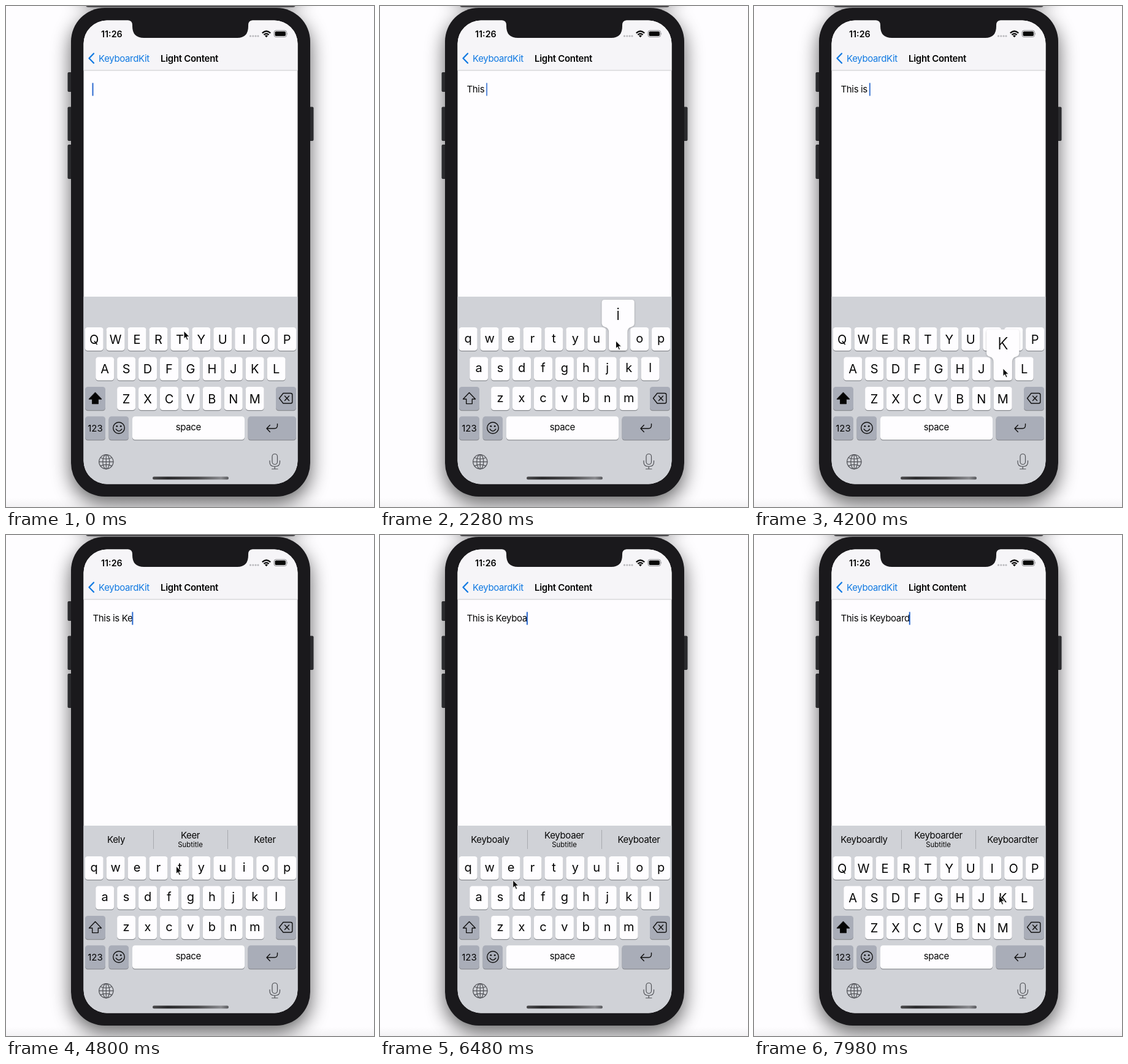
An HTML page that plays this animation: 600 px wide and 817 px high, repeating every 8 s.

```html
<!DOCTYPE html>
<html lang="en">
<head>
<meta charset="utf-8">
<title>Keyboard typing</title>
<style>
  html, body { margin: 0; width: 100%; height: 100%; overflow: hidden; background: #fefdff; }
  svg { display: block; width: 100%; height: 100%; }
  text { font-family: Inter, "Open Sans", sans-serif; font-size: 15px; letter-spacing: -.35px; fill: #050505; white-space: pre; }
  .mid { text-anchor: middle; }
  .key { font-size: 20px; letter-spacing: 0; }
  .line { fill: none; stroke: #111; stroke-width: 1.4; stroke-linecap: round; stroke-linejoin: round; }
  .gray { stroke: #505257; stroke-width: 1.2; }
</style>
</head>
<body>
<svg viewBox="0 0 600 817">
  <defs>
    <filter id="soft" x="-40%" y="-20%" width="180%" height="140%"><feGaussianBlur stdDeviation="16"/></filter>
    <filter id="lift" x="-30%" y="-30%" width="160%" height="160%"><feDropShadow dx="0" dy="1" stdDeviation="1.6" flood-opacity=".28"/></filter>
    <linearGradient id="floor" x1="0" y1="0" x2="0" y2="1"><stop offset="0" stop-color="#fefdff"/><stop offset="1" stop-color="#f3f2f4"/></linearGradient>
    <linearGradient id="bar"><stop offset="0" stop-color="#4a4a4c"/><stop offset=".2" stop-color="#29292b"/><stop offset=".6" stop-color="#4b4b4d"/><stop offset=".9" stop-color="#8b8c90"/><stop offset="1" stop-color="#58595c"/></linearGradient>
    <clipPath id="glass"><rect x="126.5" y="23.5" width="349" height="756" rx="38"/></clipPath>
  </defs>

  <rect width="600" height="817" fill="#fefdff"/>
  <rect y="802" width="600" height="15" fill="url(#floor)"/>
  <g filter="url(#soft)" fill="#000" opacity=".62">
    <rect x="106" y="17" width="390" height="794" rx="54"/>
    <rect x="106" y="-800" width="390" height="800" rx="54"/>
  </g>
  <rect x="130" y="-10" width="342" height="12" rx="4" fill="#4a494c"/>

  <g fill="#2b2b2e">
    <rect x="100.5" y="108" width="8" height="32" rx="2"/>
    <rect x="100.5" y="164.500" width="8" height="55.500" rx="2"/>
    <rect x="100.500" y="226" width="8" height="56" rx="2"/>
    <rect x="493" y="164.500" width="8.500" height="55.500" rx="2"/>
  </g>
  <rect x="106" y="3" width="390" height="797" rx="55" fill="#1a191c"/>

  <g clip-path="url(#glass)">
    <rect x="126" y="23" width="350" height="757" fill="#fefdff"/>
    <rect x="126" y="23" width="350" height="82" fill="#f6f5f8"/>
    <rect x="126" y="104.500" width="350" height="1" fill="#c9c9cc"/>
    <rect x="126" y="474" width="350" height="306" fill="#d0d2d7"/>
  </g>
  <path d="M199 23 Q206 24 206 31 V33 Q206 52 225 52 H377 Q395 52 395 33 V31 Q395 24 402 23 Z" fill="#1a191c"/>

  <text x="155" y="50.500" font-weight="600" style="font-size:14.300px;letter-spacing:0">11:26</text>
  <g fill="#b9b9bd"><circle cx="398.500" cy="49" r="1.600"/><circle cx="402.800" cy="49" r="1.600"/><circle cx="407" cy="49" r="1.600"/><circle cx="411" cy="49" r="1.600"/></g>
  <g fill="none" stroke="#0a0a0a" stroke-width="2.300">
    <path d="M417.800 44.200 Q424.500 37.800 431.200 44.200"/>
    <path d="M420.400 47 Q424.500 43.200 428.600 47"/>
  </g>
  <path d="M422 48.600 Q424.500 46.500 427 48.600 L424.500 51.200 Z"/>
  <rect x="437" y="40" width="20.500" height="10.500" rx="3" fill="none" stroke="#8a8a8d"/>
  <rect x="438.500" y="41.500" width="17.500" height="7.500" rx="1.800" fill="#080808"/>
  <path d="M458.500 43.500 Q460 45.200 458.500 47 Z" fill="#8a8a8d"/>

  <path d="M143 77.500 L135.500 85.300 L143 93" fill="none" stroke="#1079e2" stroke-width="2.300" stroke-linecap="round" stroke-linejoin="round"/>
  <text x="151" y="90.800" style="fill:#1079e2">KeyboardKit</text>
  <text x="252" y="90.800" font-weight="600" style="letter-spacing:-.3px">Light Content</text>

  <text id="typed" x="141.500" y="141"></text>
  <rect id="caret" y="125.500" width="2" height="21" fill="#2a69cf"/>

  <g id="hints">
    <path d="M240.500 481 V512 M361.500 481 V512" stroke="#a8aaaf"/>
    <text id="hintA" class="mid" x="179.500" y="502"></text>
    <text id="hintB" class="mid" x="300.500" y="494.700"></text>
    <text id="hintC" class="mid" x="422" y="502"></text>
    <text class="mid" x="300.500" y="509" style="font-size:11.400px;letter-spacing:0">Subtitle</text>
  </g>

  <g id="keys"></g>

  <path id="shift" class="line" d="M145.500 630.500 L155.500 641 H150.300 V648.600 H140.700 V641 H135.500 Z"/>
  <path class="line" d="M452 631.500 H464 Q466.800 631.500 466.800 634 V645.500 Q466.800 648 464 648 H452 L445.500 639.800 Z M454.500 636 L461.500 643.500 M461.500 636 L454.500 643.500"/>
  <text class="mid" x="145.500" y="693.500" style="letter-spacing:0">123</text>
  <g class="line"><circle cx="184" cy="688" r="9.300"/><path d="M179.200 690 Q184 696.500 188.800 690"/></g>
  <circle cx="180.800" cy="685.300" r="1.300"/><circle cx="187.200" cy="685.300" r="1.300"/>
  <text class="mid" x="297.300" y="692">space</text>
  <path class="line" d="M442.500 681.500 V684 Q442.500 689 437.500 689 H425 M430.300 683.500 L425 689 L430.300 694.500"/>
  <g class="line gray">
    <circle cx="163.300" cy="743.300" r="11.600"/><ellipse cx="163.300" cy="743.300" rx="5.500" ry="11.600"/>
    <path d="M163.300 731.700 V755 M151.700 743.300 H175 M154 736.500 Q163.300 741 172.600 736.500 M154 750.100 Q163.300 745.600 172.600 750.100"/>
    <rect x="434" y="730.500" width="8.500" height="17" rx="4.250"/>
    <path d="M430 741.500 V744 Q430 751 438.200 751 Q446.500 751 446.500 744 V741.500 M438.200 751 V755 M433.500 755 H443"/>
  </g>
  <rect x="239" y="767.600" width="124" height="4.600" rx="2.300" fill="url(#bar)"/>

  <g id="callout">
    <path d="M-22 -45 H22 Q26.500 -45 26.500 -40.500 V-7 Q26.500 -2 21 -.5 Q15 1 15 8 V34 Q15 38 11 38 H-11 Q-15 38 -15 34 V8 Q-15 1 -21 -.5 Q-26.500 -2 -26.500 -7 V-40.500 Q-26.500 -45 -22 -45 Z" fill="#fefdff" filter="url(#lift)"/>
    <text id="big" class="mid" y="-12.500" font-weight="300" style="font-size:27px;letter-spacing:0"></text>
  </g>
  <path id="arrow" d="M0 0 V12.600 L2.900 10 L4.900 14.800 L7 13.900 L5 9.200 H9 Z" fill="#0a0a0a" stroke="#fff" stroke-width=".9" stroke-linejoin="round"/>
</svg>

<script>
const LOOP = 8000;
const $ = id => document.getElementById(id);

function add(tag, attrs, text = '') {
  const el = document.createElementNS('http://www.w3.org/2000/svg', tag);
  for (const k in attrs) el.setAttribute(k, attrs[k]);
  el.textContent = text;
  $('keys').append(el);
  return el;
}

function cap(x, y, w, fill) {
  add('rect', { x, y: y + 1.2, width: w, height: 38, rx: 4.5, fill: '#8b8d92' });
  add('rect', { x, y, width: w, height: 38, rx: 4.5, fill });
}

const WHITE = '#fefdff', DARK = '#a9adb8';
const keys = {};
[['qwertyuiop', 143.7, 524], ['asdfghjkl', 161.2, 572.5], ['zxcvbnm', 196.1, 621]].forEach(([row, x0, y]) => {
  [...row].forEach((ch, i) => {
    const x = x0 + i * 34.93;
    cap(x - 15, y, 30, WHITE);
    keys[ch] = { x, y, label: add('text', { x, class: 'mid key' }) };
  });
});
[[129, 621, 33, DARK], [440, 621, 33, DARK], [129, 669.3, 33, DARK], [167.5, 669.3, 32.5, DARK],
 [206, 669.3, 183, WHITE], [394.5, 669.3, 78.5, DARK]].forEach(k => cap(...k));

// Each tap: key, press time, pointer x, pointer y; '^' is shift
const HOLD = 100;
const taps = [
  ['t', 190, 287, 532], ['h', 600, 335, 588], ['i', 1000, 389.5, 536], ['s', 1340, 198, 588],
  [' ', 1800, 300, 675], ['i', 2230, 384.5, 546], ['s', 2740, 198, 590], [' ', 3260, 300, 674],
  ['^', 3740, 155, 635], ['k', 4150, 406, 591], ['e', 4540, 216, 540], ['y', 4900, 320, 540],
  ['b', 5260, 339.5, 646], ['o', 5740, 424, 540], ['a', 6180, 160, 600], ['r', 6600, 250, 541],
  ['d', 7000, 232, 590], ['^', 7450, 161, 635]
];

const ramp = (t, a, b) => {
  const u = Math.min(1, Math.max(0, (t - a) / (b - a)));
  return u * u * (3 - 2 * u);
};

function pointer(t) {
  let x = 290, y = 530, leave = 60;
  for (const [, at, tx, ty] of [...taps, ['', LOOP, 399.5, 588]]) {
    const u = ramp(t, leave, at - 20);
    x += (tx - x) * u;
    y += (ty - y) * u;
    leave = at + HOLD + 60;
    if (t < leave) break;
  }
  return [x, y];
}

// Replays the taps up to time t
function typing(t) {
  const s = { text: '', upper: true, held: null, last: 0 };
  for (const [key, at] of taps) {
    if (t < at) break;
    if (t < at + HOLD) { s.held = key; break; }
    if (key === '^') { s.upper = true; continue; }
    s.text += s.upper ? key.toUpperCase() : key;
    s.upper = false;
    s.last = at + HOLD;
  }
  return s;
}

function blink(age) {
  const p = age % 1000;
  return 1 - ramp(p, 300, 560) + ramp(p, 680, 880);
}

function draw(t) {
  const { text, upper, held, last } = typing(t);
  const show = ch => upper ? ch.toUpperCase() : ch;

  for (const ch in keys) {
    const { y, label } = keys[ch];
    label.textContent = ch === held ? '' : show(ch);
    label.setAttribute('y', y + (upper ? 26.6 : 24.8));
  }
  $('shift').style.fill = upper ? '#050505' : 'none';

  $('typed').textContent = text;
  $('caret').setAttribute('x', 140.5 + (text ? $('typed').getComputedTextLength() : 0));
  $('caret').setAttribute('opacity', blink(t - last));

  const word = text.split(' ').pop();
  $('hints').style.display = word ? '' : 'none';
  $('hintA').textContent = word + 'ly';
  $('hintB').textContent = word + 'er';
  $('hintC').textContent = word + 'ter';

  const key = keys[held];
  $('callout').style.display = key ? '' : 'none';
  if (key) {
    $('callout').setAttribute('transform', `translate(${key.x} ${key.y})`);
    $('big').textContent = show(held);
  }
  $('arrow').setAttribute('transform', `translate(${pointer(t)})`);
}

const start = performance.now();
function tick() {
  draw((performance.now() - start) % LOOP);
  requestAnimationFrame(tick);
}
tick();
</script>
</body>
</html>
```
